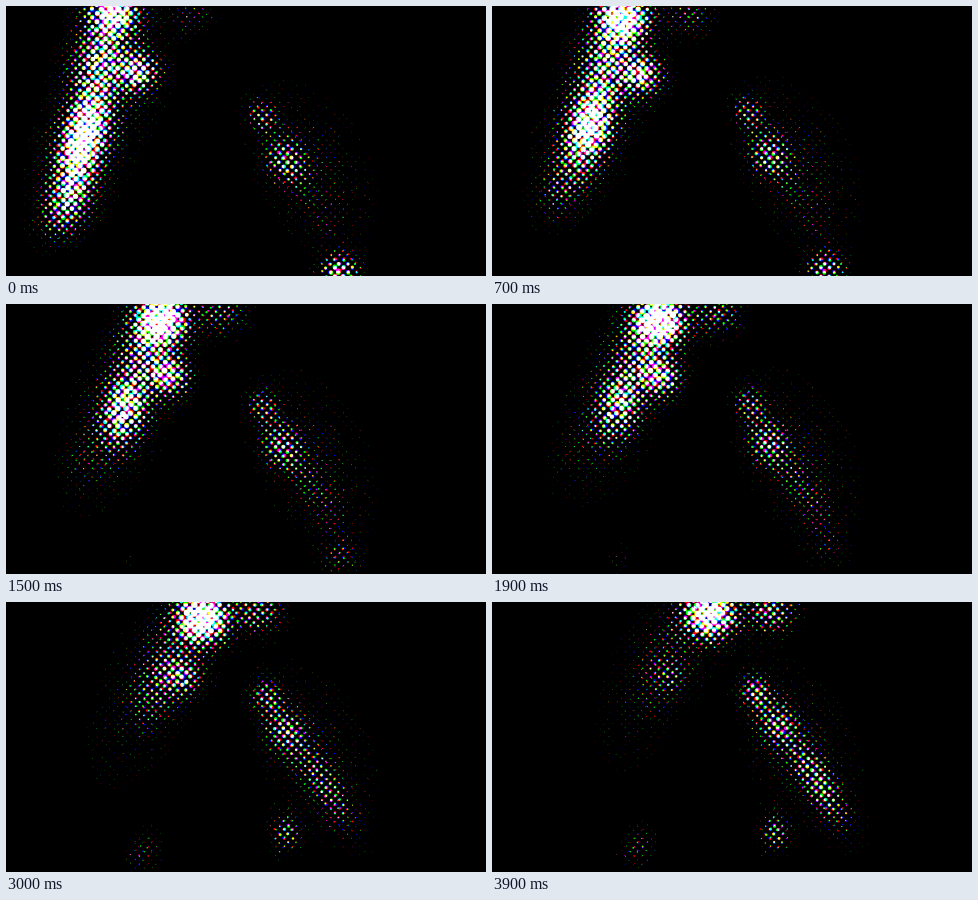
Recreate the animation shown at these times as an HTML page with a canvas. Size 480x270 px, loop 4 s.

```html
<!DOCTYPE html>
<html lang="en">
<head>
<meta charset="utf-8">
<title>Halftone lights</title>
<style>
  html, body { margin: 0; width: 100%; height: 100%; overflow: hidden; background: #000; }
  canvas { display: block; width: 480px; height: 270px; }
</style>
</head>
<body>
<canvas id="stage" width="480" height="270"></canvas>
<script>
const ctx = document.getElementById('stage').getContext('2d');
const LOOP = 4000, STEP = 100;
const PITCH = 6 * Math.SQRT2;
const MAX_RADIUS = 4.7;
const CHANNELS = ['#f00', '#0f0', '#00f'];

const mix = (a, b, k) => a + (b - a) * k;
const smooth = (a, b, x) => {
  const k = Math.max(0, Math.min(1, (x - a) / (b - a)));
  return k * k * (3 - 2 * k);
};

// A soft ellipse; its long axis leans by the given slope.
function light(x, y, power, width, length = width, slope = 0) {
  const scale = Math.hypot(1, slope);
  return { x, y, power, width, length, dx: slope / scale, dy: 1 / scale };
}

function leftFigure(u) {
  const fade = (1 + Math.cos(Math.PI * u)) / 2;
  const settle = 1 - (1 - u) ** 2.5;
  const rise = Math.sin(Math.PI * u * .85);
  const head = light(107 + 138 * u - 25 * u * u, 5 + 12 * rise, 1.25 + .4 * rise, 16);
  const arm = light(mix(131, 177, settle), mix(66, 74, settle), .85 - .7 * u ** 3, 13);
  const body = light(77 + 125 * u - 40 * u * u, 134 - 95 * u + 48 * u * u,
    1.3 * fade + .05, 14, mix(22, 38, (1 - u) ** 4), -.28);
  const tail = light(mix(61, 111, u), mix(199, 89, u), .5 * (1 - u) ** 4, 13, 20, -.5);
  const shoulder = light(94 + 140 * u - 55 * u * u, mix(50, 42, u), .1 + .55 * fade, 17, 23, -.4);
  const glow = light(mix(92, 162, u), mix(112, 75, u), mix(.15, .07, u), 29, 65, -.45);
  return [head, arm, body, tail, shoulder, glow];
}

function rightLimb(u) {
  const upper = light(mix(256, 264, u * u), mix(110, 90, u), .36 + .2 * u ** 3, 9, 11, .4);
  const joint = light(280 - 22 * u + 28 * u * u, mix(154, 121, u), .48, 12, 15, .4);
  const lower = light(mix(308, 326, u * u), mix(195, 179, u), .07 + .45 * u * u, 10, 32, .6);
  const glow = light(308, mix(165, 145, u), .085, 34, 60, .45);
  return [upper, joint, lower, glow];
}

function smallSpots(u) {
  return [
    light(185 + 70 * u + 26 * u * u, 9, .14 + .42 * u, 15, 13),
    light(333, 266 - 100 * u * u, .72 * Math.exp(-((u / .33) ** 2)), 11),
    light(mix(268, 283, u), 231, .36 * smooth(.57, .78, u), 9, 12),
    light(mix(111, 146, u), mix(267, 244, u), .16 * smooth(.2, .9, u), 10, 14, -.3)
  ];
}

function noise(a, b, c) {
  const n = Math.sin(a * 127.1 + b * 311.7 + c * 74.7) * 43758.5453;
  return n - Math.floor(n) - .5;
}

// Staggered rows; each colour sits slightly off the cell centre.
const dots = [];
for (let row = -2; row < 66; row++) {
  for (let col = -1; col < 59; col++) {
    dots.push({
      x: 2 + (col + (row & 1) / 2) * PITCH,
      y: 3 + row * PITCH / 2,
      tints: CHANNELS.map((_, c) => ({
        x: noise(col, row, c) * 2,
        y: noise(col, row, c + 5) * 2,
        grow: noise(col, row, c + 9) * .5
      }))
    });
  }
}

function brightness(x, y, lights) {
  let sum = 0;
  for (const l of lights) {
    const rx = x - l.x, ry = y - l.y;
    const along = (rx * l.dx + ry * l.dy) / l.length;
    const across = (rx * l.dy - ry * l.dx) / l.width;
    sum += l.power * Math.exp(-(along * along + across * across) / 2);
  }
  return sum;
}

function draw(time) {
  const u = time / LOOP;
  const lights = [...leftFigure(u), ...rightLimb(u), ...smallSpots(u)];
  ctx.globalCompositeOperation = 'source-over';
  ctx.fillStyle = '#000';
  ctx.fillRect(0, 0, 480, 270);
  ctx.globalCompositeOperation = 'lighter';
  const sizes = dots.map(d => MAX_RADIUS * (1 - Math.exp(-brightness(d.x, d.y, lights))));
  CHANNELS.forEach((color, c) => {
    ctx.fillStyle = color;
    ctx.beginPath();
    dots.forEach((d, i) => {
      const tint = d.tints[c];
      const radius = sizes[i] + tint.grow;
      if (sizes[i] < .1 || radius < .15) return;
      const x = d.x + tint.x, y = d.y + tint.y;
      ctx.moveTo(x + radius, y);
      ctx.arc(x, y, radius, 0, Math.PI * 2);
    });
    ctx.fill();
  });
}

const start = performance.now();
let shown = -1;
function tick() {
  const elapsed = (performance.now() - start) % LOOP;
  const time = Math.floor(elapsed / STEP) * STEP;
  if (time !== shown) draw(shown = time);
  requestAnimationFrame(tick);
}
tick();
</script>
</body>
</html>
```
